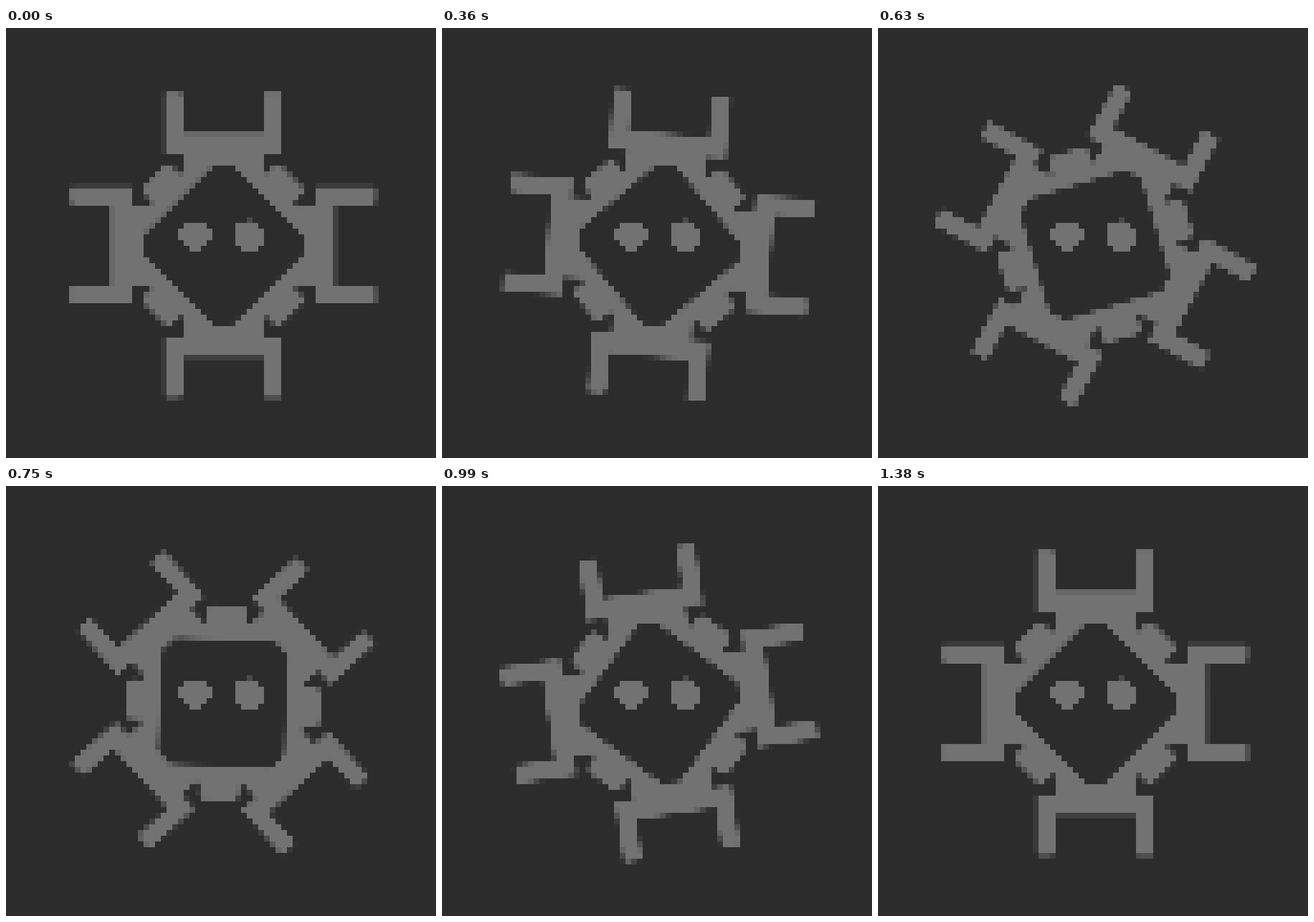
Write an HTML page without scripts that moves like this. It is 600x600 px and loops after 1800 ms.

```html
<!DOCTYPE html>
<html lang="en">
<head>
<meta charset="utf-8">
<title>Spinning pixel bug</title>
<style>
  @property --t { syntax: "<number>"; inherits: false; initial-value: 0; }

  html, body { margin: 0; width: 100%; height: 100%; overflow: hidden; background: #2c2c2c; }
  svg { display: block; width: 600px; height: 600px; fill: #727272; }

  /* --t is the time in ms, advanced every 30 ms; the angle follows
     cubic-bezier(1, 0, 0, 1) in closed form: half a turn in 1380 ms. */
  .spin {
    --v: clamp(-0.5, (var(--t) - 715) / 1380, 0.5);
    --u: (pow(max(var(--v), 0) / 4, 1 / 3) - pow(max(0 - var(--v), 0) / 4, 1 / 3));
    transform-origin: 0 0;
    transform: rotate(calc(180deg * (0.5 + 1.5 * var(--u) - var(--v) / 2)));
    animation: clock 1800ms steps(60, end) infinite;
  }
  @keyframes clock { from { --t: 0; } to { --t: 1800; } }
</style>
</head>
<body>
<svg viewBox="0 0 600 600">
  <defs>
    <!-- Samples one point per 8px cell and spreads it over the cell. -->
    <filter id="pixelate" filterUnits="userSpaceOnUse" x="0" y="0" width="600" height="600" color-interpolation-filters="sRGB">
      <feFlood x="4" y="4" width="1" height="1" flood-color="#000" result="dot"/>
      <feComposite in="dot" in2="dot" operator="over" x="0" y="0" width="8" height="8" result="cell"/>
      <feTile in="cell" x="0" y="0" width="600" height="600" result="grid"/>
      <feGaussianBlur in="SourceGraphic" stdDeviation="1" result="soft"/>
      <feComposite in="soft" in2="grid" operator="in"/>
      <feMorphology operator="dilate" radius="3" result="block"/>
      <feOffset dx="-1" result="left"/>
      <feMerge result="wide">
        <feMergeNode in="left"/>
        <feMergeNode in="block"/>
      </feMerge>
      <feOffset in="wide" dy="-1" result="up"/>
      <feMerge>
        <feMergeNode in="up"/>
        <feMergeNode in="wide"/>
      </feMerge>
    </filter>

    <g id="side">
      <path d="M-56 -156H56V-102L46 -112H-46L-56 -102z"/>
      <path d="M-82 -211l2 -2h20l4 4V-156H56V-209l4 -4h20l2 2V-128H-82z"/>
      <path d="M-28 -110V-130L-22 -136H22L28 -130V-110z" transform="rotate(45)"/>
    </g>
  </defs>

  <g filter="url(#pixelate)">
    <rect x="-20" y="-20" width="640" height="640" fill="#2c2c2c"/>
    <g transform="translate(303.5 303.5)">
      <g class="spin">
        <rect x="-100" y="-100" width="200" height="200" transform="rotate(45)"
              fill="none" stroke="#727272" stroke-width="24" stroke-linejoin="bevel"/>
        <use href="#side"/>
        <use href="#side" transform="rotate(90)"/>
        <use href="#side" transform="rotate(180)"/>
        <use href="#side" transform="rotate(270)"/>
      </g>
    </g>
  </g>

  <g shape-rendering="crispEdges">
    <path d="M248 272h32v8h8v16h-8v8h-8v8h-16v-8h-8v-8h-8v-16h8z"/>
    <path d="M320 272h32v8h8v24h-8v8h-24v-8h-8z"/>
    <path d="M336 264h8v8h-8z" fill="#4a4a4a"/>
  </g>
</svg>
</body>
</html>
```
